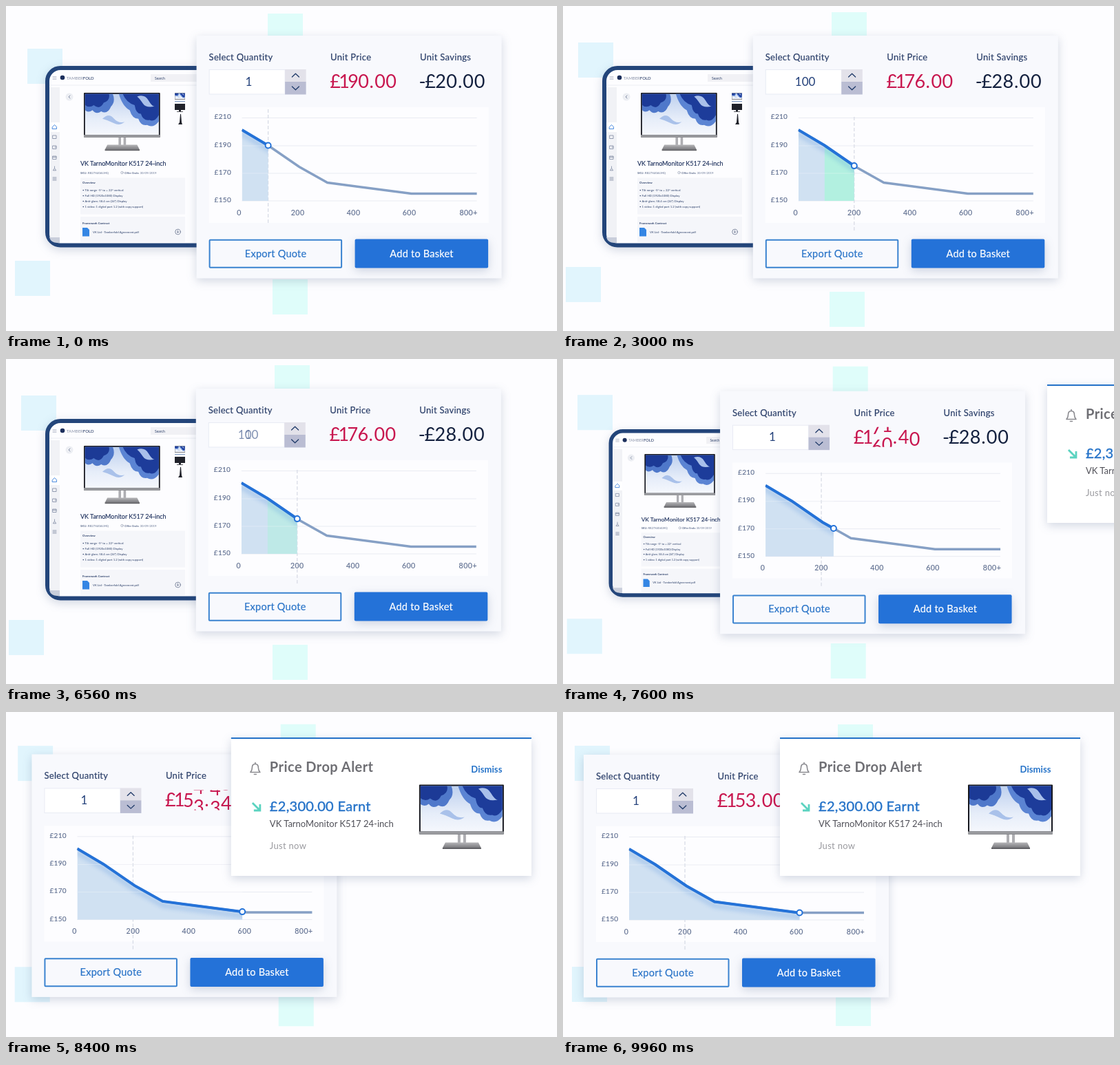
Animation of 800 by 472 pixels, one loop 10 s. Source, as an HTML page:

```html
<!DOCTYPE html>
<html lang="en">
<head>
<meta charset="utf-8">
<title>Quantity pricing</title>
<style>
  html, body { margin: 0; width: 100%; height: 100%; overflow: hidden; background: #fdfdff; }
  svg { display: block; width: 800px; height: 472px; font-family: Lato, "Open Sans", sans-serif; }
  .label { font-size: 13px; letter-spacing: .3px; fill: #2b3f69; stroke: #2b3f69; stroke-width: .2px; }
  .axis { font-size: 10px; letter-spacing: .3px; fill: #5c6c8e; stroke: #5c6c8e; stroke-width: .15px; }
  .button { font-size: 14.5px; letter-spacing: .25px; text-anchor: middle; stroke-width: .2px; }
  .digits { font-size: 27px; text-anchor: middle; }
  .tiny { font-size: 4.3px; fill: #2b3f69; }
  .stroke { fill: none; stroke-linecap: round; stroke-linejoin: round; }
  .card { filter: drop-shadow(0 4px 7px rgba(40, 65, 110, .2)); }
</style>
</head>
<body>
<svg viewBox="0 0 800 472">
  <defs>
    <linearGradient id="sky" x2="0" y2="1">
      <stop offset="0" stop-color="#bccfee"/><stop offset=".6" stop-color="#e6edf9"/><stop offset="1" stop-color="#f6f8fd"/>
    </linearGradient>
    <linearGradient id="metal" x2="0" y2="1">
      <stop offset="0" stop-color="#b5b5b8"/><stop offset="1" stop-color="#77777b"/>
    </linearGradient>
    <clipPath id="screenClip"><rect x="2" y="2" width="119" height="66"/></clipPath>
    <clipPath id="activeClip"><rect id="activeRect" x="66" y="100" height="141"/></clipPath>
    <clipPath id="bonusClip"><rect id="bonusRect" x="104" y="100" height="141"/></clipPath>
    <clipPath id="wheelClip"><rect x="180" y="52" width="260" height="29"/></clipPath>
    <clipPath id="quantityClip"><rect id="quantityRect" y="52" height="30"/></clipPath>

    <g id="screen">
      <rect width="123" height="72" rx="1" fill="#17181f"/>
      <g clip-path="url(#screenClip)">
        <rect width="123" height="70" fill="url(#sky)"/>
        <path d="M0 0H46Q52 14 44 22Q38 36 28 30Q20 36 14 28Q6 34 0 26Z" fill="#4f78ca"/>
        <path d="M0 0H40Q44 12 32 16Q26 28 16 20Q8 26 0 18Z" fill="#1c3a96"/>
        <path d="M56 0H121V46Q112 58 102 52Q92 54 88 42Q78 42 74 28Q62 22 56 0Z" fill="#5b84d3"/>
        <path d="M62 0H121V36Q114 48 106 44Q96 46 92 34Q84 34 82 20Q68 16 62 0Z" fill="#1d3c9a"/>
        <path d="M30 42Q40 32 48 41T66 47Q58 54 48 49T30 42Z" fill="#a9c1ea"/>
        <path d="M86 6Q98 2 104 12T114 22Q100 25 95 17T86 6Z" fill="#a9c0ea"/>
      </g>
      <rect y="68" width="123" height="4" fill="#9a9b9f"/>
    </g>
    <g id="monitor">
      <path d="M56 72h4v18h-4zM64 72h4v18h-4z" fill="#aeaeb2"/>
      <path d="M38 84H86L90 92H34Z" fill="url(#metal)"/>
      <rect x="34" y="91.500" width="56" height="2" fill="#626266"/>
      <use href="#screen"/>
    </g>
    <path id="curve" d="M66 137L104 159.5L149 190.5L190 213.5L312 229.5H407"/>
    <path id="area" d="M66 137L104 159.5L149 190.5L190 213.5L312 229.5H407V240H66Z"/>
  </defs>

  <g id="squares"></g>

  <g id="tablet">
    <rect x="3" y="3" width="344" height="257.500" rx="19" fill="#fdfdff" stroke="#23457a" stroke-width="6" class="card"/>
    <path d="M6 31H21V256H14Q6 254 6 244Z" fill="#f1f2f6"/>
    <rect x="6" y="82" width="15" height="14" fill="#fff"/>
    <path d="M6 249H21V257H18Q8 257 6 249Z" fill="#c9cedb"/>
    <path d="M6 28H220" stroke="#eceef3"/>
    <g class="stroke" stroke="#7c87a0" stroke-width=".8">
      <path d="M11 15.500h5m-5 2h5m-5 2h5" stroke-width=".5"/>
      <path d="M10.500 88.500l3-3 3 3v3h-6z" stroke="#2472d8"/>
      <path d="M11 101h5v4.500h-5zM11 116h5v4.500h-5zm3 2h2M11 131h5v4.500h-5zm0 1.500h5M13.500 146v2m-2 3.500l2-3 2 3zM11 162h5m-5 2h5m-5 2h5"/>
    </g>
    <circle cx="25" cy="17" r="3.300" fill="#1c2f5c"/>
    <text x="31" y="19.500" font-size="6" fill="#8a93a8">TAMBER<tspan fill="#1c2f5c">FOLD</tspan></text>
    <rect x="153" y="12" width="80" height="11" fill="#f1f1f5"/>
    <text x="159" y="19.500" class="tiny" style="font-size:5px">Search</text>
    <circle cx="35" cy="45" r="5.500" fill="#eceef3"/>
    <path d="M36 43l-2 2 2 2" class="stroke" stroke="#66728f" stroke-width=".8"/>
    <use href="#monitor" transform="translate(56 39) scale(.9)"/>
    <use href="#screen" transform="translate(188 39.500) scale(.122 .13)"/>
    <path d="M188 51.500h15" stroke="#5478ad" stroke-width=".8"/>
    <path d="M188 55h15v9h-6v2h3v.8h-9v-.8h3v-2h-6z" fill="#20222a"/>
    <path d="M196 70l1 0 1 12 1 3h-6l2-3z" fill="#20222a"/>
    <text x="51" y="145" font-size="9" fill="#1c2f5c" stroke="#1c2f5c" stroke-width=".15">VK TarnoMonitor K517 24-inch</text>
    <text x="51" y="156.500" class="tiny" opacity=".75"><tspan font-weight="700">SKU:</tspan> RB27X40#LMQ</text>
    <circle cx="111.500" cy="155" r="1.700" class="stroke" stroke="#66728f" stroke-width=".5"/>
    <text x="115" y="156.500" class="tiny" opacity=".75"><tspan font-weight="700">Offer Ends:</tspan> 30/09/2019</text>
    <rect x="51" y="162.500" width="152" height="53" fill="#f5f6fa"/>
    <text class="tiny"><tspan x="54" y="171" font-weight="700">Overview</tspan>
      <tspan x="54" y="182">• Tilt range -5° to + 22° vertical</tspan>
      <tspan x="54" y="190">• Full HD (1920x1080) Display</tspan>
      <tspan x="54" y="198">• Anti-glare; 58.4 cm (24") Display</tspan>
      <tspan x="54" y="206">• 1 video: 1 digital port 1.2 (with copy support)</tspan></text>
    <rect x="51" y="219" width="152" height="37" fill="#f5f6fa"/>
    <text x="54" y="229.500" class="tiny" font-weight="700">Framework Contract</text>
    <path d="M54 235h7l3 3v9.500h-10z" fill="#3486e4"/>
    <text x="69" y="242.500" class="tiny">VK Ltd - Tamberfold Agreement.pdf</text>
    <circle cx="192.500" cy="241" r="3.800" class="stroke" stroke="#53617f" stroke-width=".7"/>
    <path d="M192.500 239v3m-1.300-1l1.300 1.300 1.300-1.300" class="stroke" stroke="#53617f" stroke-width=".7"/>
  </g>

  <g id="panel">
    <rect width="443" height="352.500" fill="#f8f9fd" class="card"/>
    <text x="18" y="36" class="label">Select Quantity</text>
    <text x="194.500" y="36" class="label">Unit Price</text>
    <text x="324.500" y="36" class="label">Unit Savings</text>
    <rect x="18.500" y="49.500" width="110" height="35.500" fill="#fff" stroke="#e8ebf4"/>
    <rect x="128.500" y="49" width="30.500" height="18.500" fill="#e3e2ea"/>
    <rect x="128.500" y="67" width="30.500" height="18.500" fill="#babdd3"/>
    <path d="M138.800 60l5-4.700 5 4.700M138.800 74l5 4.700 5-4.700" class="stroke" stroke="#1f3a68" stroke-width="1.300"/>
    <g font-size="17" fill="#23407a">
      <text id="hundred" y="72.500" clip-path="url(#quantityClip)">100</text>
      <text id="single" x="76" y="72.500" text-anchor="middle">1</text>
    </g>
    <g id="price" class="digits" fill="#c8174f" clip-path="url(#wheelClip)"></g>
    <g id="savings" class="digits" fill="#14213f" clip-path="url(#wheelClip)"></g>

    <rect x="18" y="104" width="406" height="168" fill="#fdfdff"/>
    <path d="M66 119.500H407M66 160H407M66 200H407M66 240H407" stroke="#e9ebf2"/>
    <g id="axes" class="axis"></g>
    <path id="guide" stroke="#d6dae4" stroke-width="1.200" stroke-dasharray="5 3"/>
    <g clip-path="url(#activeClip)">
      <use href="#area" fill="#d0e1f2"/>
      <use id="bonus" href="#area" fill="#b2f0e0" clip-path="url(#bonusClip)"/>
      <use href="#curve" y="6" class="stroke" stroke="#2472d8" stroke-width="5" opacity=".25" style="filter:blur(3px)"/>
      <path d="M66 160H407M66 200H407" stroke="#fff" opacity=".3"/>
    </g>
    <use href="#curve" fill="none" stroke="#86a0c5" stroke-width="3.500"/>
    <use href="#curve" fill="none" stroke="#2472d8" stroke-width="4" clip-path="url(#activeClip)"/>
    <circle id="marker" r="4" fill="#fff" stroke="#2472d8" stroke-width="2"/>

    <rect x="19" y="296.700" width="191.500" height="40" rx="1" fill="#f8f9fd" stroke="#3a83d0" stroke-width="2"/>
    <text x="115" y="321.500" class="button" fill="#2a74c8" stroke="#2a74c8">Export Quote</text>
    <rect x="230" y="295.500" width="193.500" height="42" rx="2" fill="#2472d8" class="card"/>
    <text x="327" y="321.500" class="button" fill="#fff" stroke="#fff">Add to Basket</text>
  </g>

  <g id="alert">
    <rect width="436" height="201" fill="#fff" class="card"/>
    <rect width="436" height="2" fill="#2472c8"/>
    <g class="stroke" stroke="#8b8b90" stroke-width="1.600">
      <path d="M28 50.500Q30.500 48 30.500 44Q30.500 38.500 35 38.500T39.500 44Q39.500 48 42 50.500Z"/>
      <path d="M35 36.500v2M33.500 53.500h3"/>
    </g>
    <text x="56" y="50" font-size="20" font-weight="700" letter-spacing=".45" fill="#6f6f74">Price Drop Alert</text>
    <text x="348.500" y="51" font-size="13" font-weight="700" letter-spacing=".1" fill="#2472c8">Dismiss</text>
    <path d="M31 95l9.500 9.500M42 97v9h-9" fill="none" stroke="#5bd3c0" stroke-width="2.800"/>
    <text x="56" y="106.500" font-size="20" letter-spacing=".3" fill="#2472c8" stroke="#2472c8" stroke-width=".4">£2,300.00 Earnt</text>
    <text x="56" y="129.500" font-size="13" fill="#505058">VK TarnoMonitor K517 24-inch</text>
    <text x="56" y="161.500" font-size="13" letter-spacing=".3" fill="#9a9a9f">Just now</text>
    <use href="#monitor" x="273" y="68.500"/>
  </g>
</svg>
<script>
const $ = id => document.getElementById(id);
const lerp = (a, b, p) => a + (b - a) * p;
const clamp = p => Math.min(1, Math.max(0, p));
const easeInOut = u => u < .5 ? 2 * u * u : 1 - 2 * (1 - u) ** 2;
const ease = (t, start, length) => easeInOut(clamp((t - start) / length));
const set = (el, attrs) => { for (const key in attrs) el.setAttribute(key, attrs[key]); };

function add(parent, tag, attrs, text = '') {
  const el = document.createElementNS('http://www.w3.org/2000/svg', tag);
  set(el, attrs);
  el.textContent = text;
  parent.append(el);
  return el;
}

[210, 190, 170, 150].forEach((n, i) => add($('axes'), 'text', { x: 26, y: 121.2 + i * 40.4 }, '£' + n));
['0', '200', '400', '600', '800+'].forEach((n, i) =>
  add($('axes'), 'text', { x: [62, 147, 228, 309, 395][i], y: 260.5, 'text-anchor': 'middle',
    style: 'font-size:10.5px;letter-spacing:.5px' }, n));

// Each square rests at three places: start, after the first move, after the second.
const squares = [
  ['#e1f5fd', [31, 62], [22, 53], [17, 49]],
  ['#e1f5fd', [13, 370], [4, 379], [13, 370]],
  ['#dffdfa', [380, 11], [390, 9], [399, 18]],
  ['#dffdfa', [387, 397], [387, 415], [396, 405]],
].map(([fill, ...stops]) => ({ stops, el: add($('squares'), 'rect', { width: 51, height: 51, fill }) }));

const BASELINE = 76, PITCH = 28;

// Fixed glyphs plus rolling digit columns, where the next higher digit sits above.
function makeCounter(group, fixed, columns) {
  for (const [glyph, x] of fixed) add(group, 'text', { x, y: BASELINE }, glyph);
  const wheels = columns.map(x => [0, 1].map(() => add(group, 'text', { x })));
  return values => wheels.forEach((pair, i) => {
    const low = Math.floor(values[i]), part = values[i] - low;
    pair.forEach((el, step) => {
      el.textContent = (low + step) % 10;
      el.setAttribute('y', BASELINE + (part - step) * PITCH);
    });
  });
}
const showPrice = makeCounter($('price'), [['£', 201.5], ['1', 214.5], ['.', 254]], [227.5, 242.5, 266.5, 282.5]);
const showSavings = makeCounter($('savings'), [['-', 328], ['£', 339.5], ['.', 382.5]], [354.5, 370.5, 394.5, 411]);

const curve = [[66, 137], [104, 159.5], [149, 190.5], [190, 213.5], [312, 229.5], [407, 229.5]];
function curveY(x) {
  const i = curve.findIndex(point => point[0] >= x);
  const [x0, y0] = curve[i - 1], [x1, y1] = curve[i];
  return lerp(y0, y1, (x - x0) / (x1 - x0));
}

function draw(t) {
  const first = ease(t, 1320, 1150);
  const reset = clamp((t - 6160) / 960);
  const slide = ease(t, 7160, 1415);
  const enter = ease(t, 7165, 1390);
  const drop = ease(t, 7107, 1416);
  const two = (a, b, c) => lerp(lerp(a, b, first), c, slide);

  for (const { el, stops: [a, b, c] } of squares)
    set(el, { x: two(a[0], b[0], c[0]), y: two(a[1], b[1], c[1]) });

  const place = (id, x, y, scale = 1) => set($(id), { transform: `translate(${x} ${y}) scale(${scale})` });
  place('tablet', lerp(57, 106, slide), lerp(87, 164, slide), lerp(1, .615, slide));
  place('panel', two(276.6, 275.8, 30), lerp(43, 62, slide));
  place('alert', lerp(798, 315, enter), 37);
  $('alert').style.display = enter ? '' : 'none';

  // The quantity grows from its centre, then fades back to one.
  const width = lerp(10, 30, first);
  set($('quantityRect'), { x: 76 - width / 2, width });
  set($('hundred'), { x: 76 - width / 2, opacity: 1 - reset });
  set($('single'), { opacity: reset });

  const price = 190 - 14 * first - 23 * drop, savings = 20 + 8 * first;
  showPrice([9 - 2 * first - 2 * drop, price, price * 10, price * 100]);
  showSavings([2, savings, savings * 2.5, savings * 5]);

  const guideX = lerp(104, 147, first);
  const markerX = lerp(guideX, 313.5, ease(t, 7300, 1300));
  set($('marker'), { cx: markerX, cy: curveY(markerX) });
  set($('activeRect'), { width: markerX - 66 });
  set($('bonusRect'), { width: markerX - 104 });
  set($('bonus'), { opacity: 1 - reset });
  set($('guide'), { d: `M${guideX} ${lerp(107, 118, first)}V${lerp(274, 284, first)}` });
}

function tick() {
  draw(performance.now() % 10000);
  requestAnimationFrame(tick);
}
tick();
</script>
</body>
</html>
```
